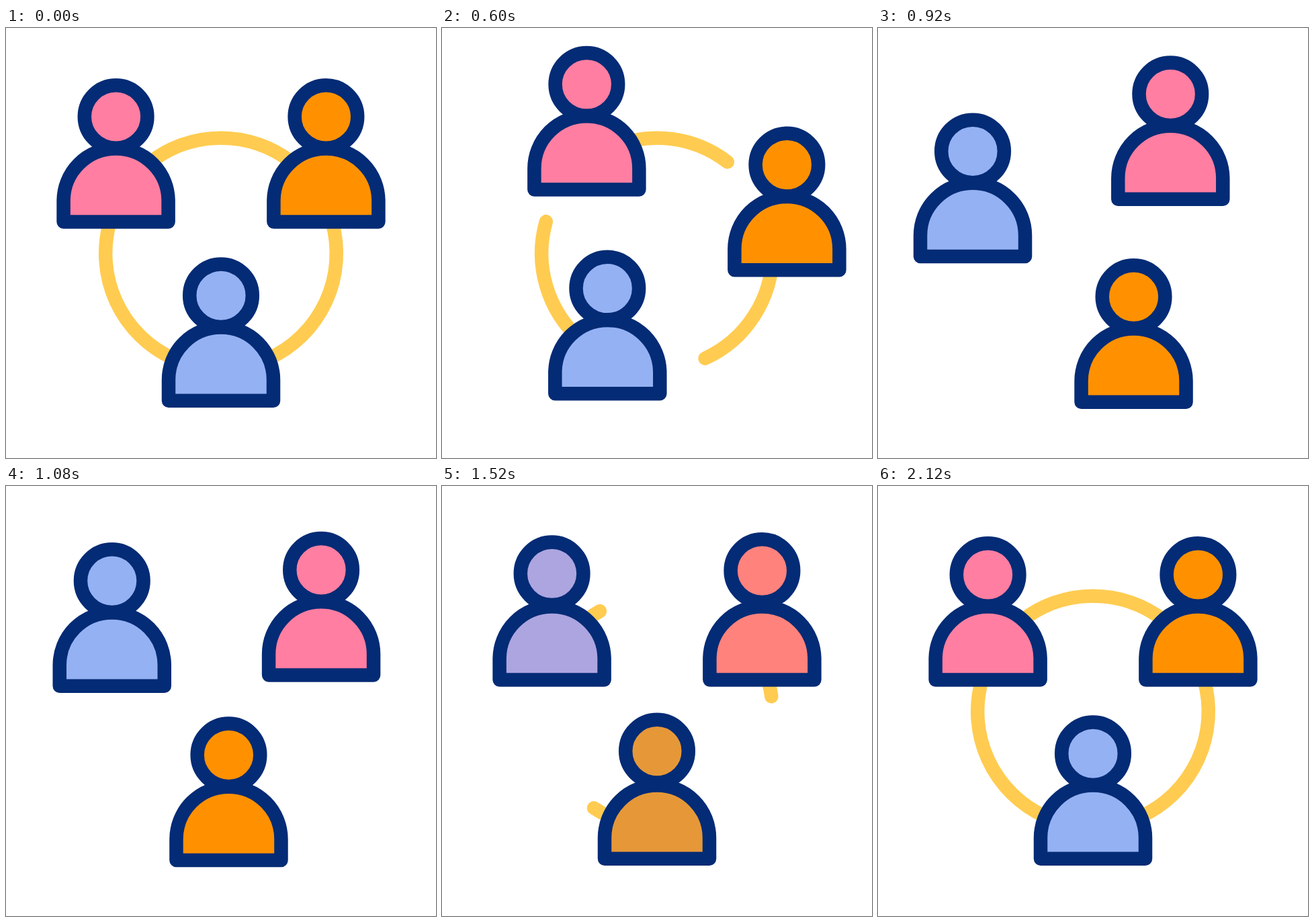
Recreate the animation shown at these times as an HTML page. Size 640 by 640 pixels, loop 2.16 s.

```html
<!DOCTYPE html>
<html lang="en">
<head>
<meta charset="utf-8">
<title>People trading places</title>
<style>
  html, body { margin: 0; width: 100%; height: 100%; overflow: hidden; background: #fff; }
  svg { display: block; width: 100vw; height: 100vh; }
  .link { fill: none; stroke: #ffcc51; stroke-linecap: round; }
  .person { stroke: #042b75; stroke-linejoin: round; }
  .link, .person { stroke-width: 20.5px; }
</style>
</head>
<body>
<svg viewBox="0 0 640 640"></svg>
<script>
const LOOP = 2160, STEP = 40;
const MOVE = [240, 1240], TINT = [1340, 2120], GROW = [1360, 2120];
const EASE = [0.61, 0.395];
const LIFT = 13, LIFT_TIME = 680;
const RING = { x: 320, y: 335.5, r: 171.8 };

const PINK = [255, 126, 161], ORANGE = [255, 145, 0], BLUE = [148, 177, 243];

// Each person travels to the next place and takes on the colour found there.
const people = [
  { route: 'M163.6 132 C239 28 385 40 476.4 132', from: PINK, to: ORANGE, liftAt: 1360 },
  { route: 'M476.4 132 A162.2 162.2 0 0 1 320 398.2', from: ORANGE, to: BLUE, liftAt: 1400 },
  { route: 'M320 398.2 C200 418 84 247 163.6 132', from: BLUE, to: PINK, liftAt: 1440 }
];

// Start and end angles of the ring pieces, in degrees.
const links = [[232.4, 307.6], [-16, 65.4], [114.6, 196]].map(span => ({ span }));

const svg = document.querySelector('svg');

function add(parent, name, attrs) {
  const el = document.createElementNS('http://www.w3.org/2000/svg', name);
  for (const key in attrs) el.setAttribute(key, attrs[key]);
  parent.appendChild(el);
  return el;
}

for (const link of links) link.el = add(svg, 'path', { class: 'link' });

for (const p of people) {
  p.path = document.createElementNS('http://www.w3.org/2000/svg', 'path');
  p.path.setAttribute('d', p.route);
  p.length = p.path.getTotalLength();
  p.el = add(svg, 'g', { class: 'person' });
  p.head = add(p.el, 'circle', { r: 46.8 });
  add(p.el, 'path', { d: 'M-78 156.6 V125.4 A78 78 0 0 1 78 125.4 V156.6 Z' });
}

const mix = (a, b, k) => a + (b - a) * k;
const sine = k => (1 - Math.cos(Math.PI * k)) / 2;
const part = (t, [a, b]) => Math.min(1, Math.max(0, (t - a) / (b - a)));

// cubic-bezier(x1, 0, x2, 1), solved by bisection.
function glide(k, [x1, x2] = EASE) {
  if (k <= 0 || k >= 1) return k;
  let lo = 0, hi = 1, s;
  for (let i = 0; i < 30; i++) {
    s = (lo + hi) / 2;
    const x = 3 * s * (1 - s) * (x1 * (1 - s) + x2 * s) + s ** 3;
    if (x < k) lo = s; else hi = s;
  }
  return s * s * (3 - 2 * s);
}

function ringPoint(deg) {
  const a = deg * Math.PI / 180;
  return (RING.x + RING.r * Math.cos(a)).toFixed(2) + ' ' + (RING.y + RING.r * Math.sin(a)).toFixed(2);
}

function draw(t) {
  const moved = glide(part(t, MOVE));
  const tint = part(t, TINT);
  const grown = sine(part(t, GROW));

  for (const { span: [a, b], el } of links) {
    const growing = t >= GROW[0];
    const start = growing ? a : mix(a, b, moved);
    const end = growing ? mix(a, b, grown) : b;
    el.setAttribute('d', end - start < 0.01 ? '' :
      `M${ringPoint(start)} A${RING.r} ${RING.r} 0 0 1 ${ringPoint(end)}`);
  }

  for (const p of people) {
    const { x, y } = p.path.getPointAtLength(p.length * moved);
    const lift = LIFT * sine(2 * part(t, [p.liftAt, p.liftAt + LIFT_TIME]));
    p.el.setAttribute('transform', `translate(${x} ${y})`);
    p.el.setAttribute('fill', `rgb(${p.from.map((c, i) => Math.round(mix(c, p.to[i], tint)))})`);
    p.head.setAttribute('cy', -lift);
  }
}

const begin = performance.now();
function tick() {
  const t = (performance.now() - begin) % LOOP;
  draw(Math.floor(t / STEP) * STEP);
  requestAnimationFrame(tick);
}
tick();
</script>
</body>
</html>
```
